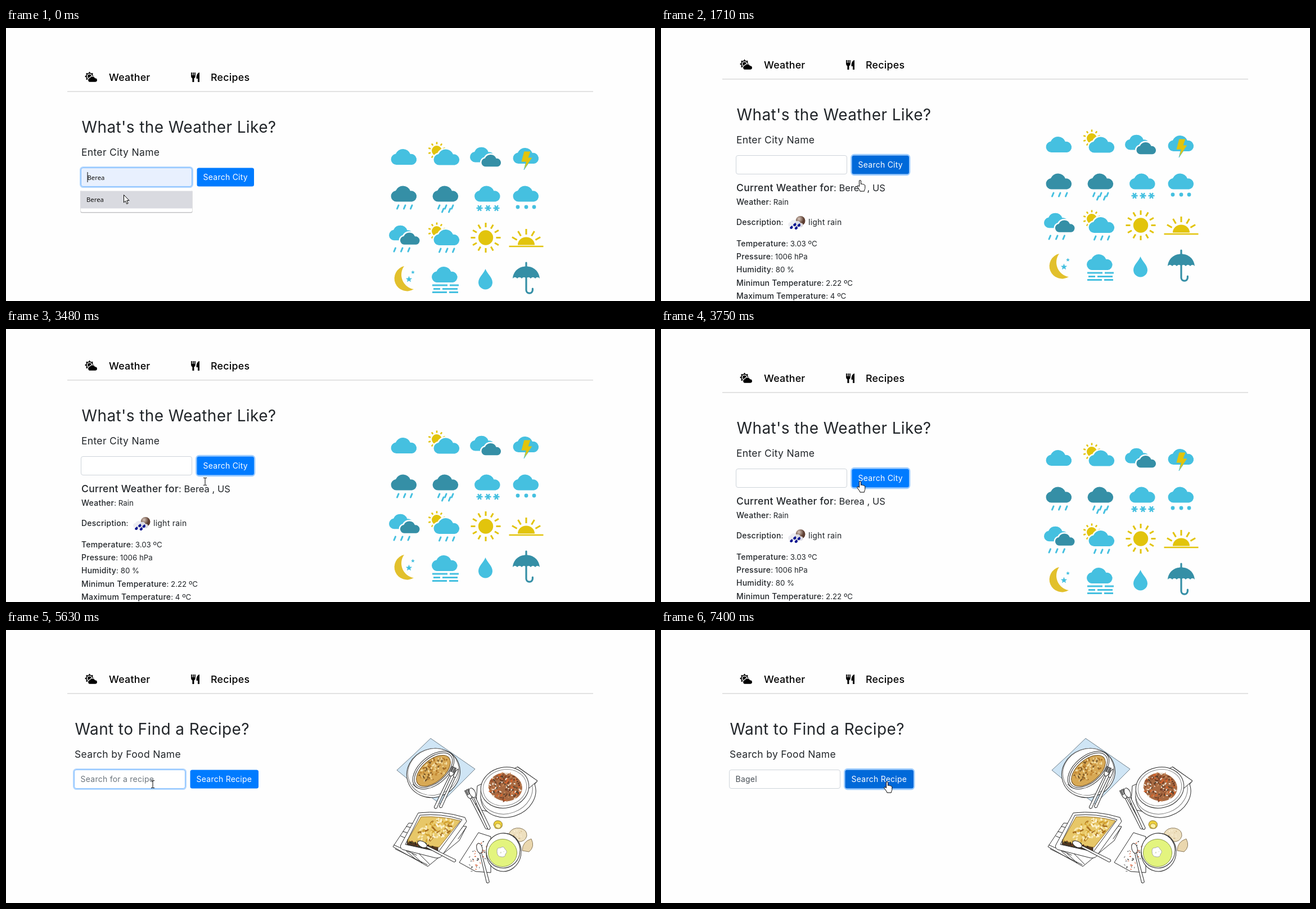
An HTML page that plays this animation: 1154 px wide and 485 px high, repeating every 8000 ms.

```html
<!DOCTYPE html>
<html lang="en">
<head>
<meta charset="utf-8">
<title>Weather and recipes</title>
<style>
  html, body { margin: 0; width: 100%; height: 100%; overflow: hidden; background: #fefefe; }
  svg { display: block; width: 1154px; height: 485px; }
  text { font: 400 14px Inter, "Open Sans", sans-serif; fill: #212529; letter-spacing: .25px; white-space: pre; }
  .nav { font-size: 17.8px; font-weight: 500; fill: #000; letter-spacing: .25px; }
  .title { font-size: 28px; letter-spacing: .38px; }
  .sub { font-size: 17.5px; letter-spacing: .32px; }
  .key { font-weight: 500; }
  .val { font-size: 13.3px; font-weight: 400; letter-spacing: 0; }
  .city { font-size: 16.5px; font-weight: 400; letter-spacing: 0; }
  .system { font: 11.3px "Noto Sans", "Open Sans", sans-serif; fill: #111; letter-spacing: 0; }
  .ink { fill: #fff; stroke: #2a2a2a; stroke-width: 1; stroke-linejoin: round; }
  .line { fill: none; stroke: #2a2a2a; stroke-width: 1; stroke-linecap: round; }
</style>
</head>
<body>
<svg viewBox="0 0 1154 485" xmlns="http://www.w3.org/2000/svg">
  <defs>
    <path id="cloud" d="M10 30A9.8 9.8 0 0 1 9 10.5A14 14 0 0 1 35 11A9.6 9.6 0 0 1 38 30Z"/>
    <radialGradient id="dusk" cx=".35" cy=".3"><stop offset="0" stop-color="#d9c8bd"/><stop offset="1" stop-color="#5c3d30"/></radialGradient>
  </defs>
  <g id="page">
    <g id="navSun"></g>
    <text class="nav" x="183" y="94">Weather</text>
    <g id="utensils">
      <path d="M329 79h1.8v5h1.2v-5h1.8v5h1.2v-5h1.8v6.5q0 3-2.4 4V96h-3v-6.5q-2.4-1-2.4-4z"/>
      <path d="M344 79V96h-3V90h-2.3C338 85 340 80 344 79z"/>
    </g>
    <text class="nav" x="364" y="94">Recipes</text>
    <rect x="109" y="112" width="935" height="1.5" fill="#dadada"/>
    <rect id="outline" x="315.5" y="62.5" width="131" height="50" fill="none" stroke="#6ca6ee" stroke-width="1.2"/>

    <g id="form">
      <text id="title" class="title" x="134.5" y="186"></text>
      <text id="sub" class="sub" x="134" y="227"></text>
      <rect id="fieldRing" x="132.3" y="247.3" width="199.4" height="35.4" rx="5" fill="none" stroke="#b3d7ff" stroke-width="2.6"/>
      <rect id="field" x="133.5" y="248.5" width="197" height="33" rx="3.5"/>
      <text id="entry" x="144.5" y="269.5"></text>
      <rect id="caret" y="256" width="1" height="18"/>
      <rect id="buttonRing" x="338.5" y="247.2" height="35.6" rx="5" fill="none" stroke="#9fcdff" stroke-width="2.8"/>
      <rect id="button" x="339.5" y="248.5" height="33" rx="3.5"/>
      <text id="label" x="350.5" y="269.5" style="fill:#fff"></text>
    </g>
    <g id="suggest">
      <rect x="132.5" y="288.5" width="199" height="40" rx="2" fill="#c4c4c6"/>
      <rect x="133" y="288" width="198" height="39" rx="2" fill="#fff"/>
      <rect x="132" y="289.5" width="199" height="31" fill="#d9dae0"/>
      <text class="system" x="143" y="309">Berea</text>
    </g>
    <g id="results"></g>
    <g id="icons"></g>
    <g id="meals"></g>
  </g>
  <path id="cursor" stroke="#000" stroke-linejoin="round"/>
</svg>

<script>
const $ = id => document.getElementById(id);
const SKY = '#45c0e0', TEAL = '#358fa6', GOLD = '#e2c40c', PAPER = '#fefefe';

// ---- weather icons ----
const cloud = (x, y, fill, scale = 1, halo = 0) =>
  `<use href="#cloud" transform="translate(${x} ${y}) scale(${scale})" fill="${fill}" stroke="${PAPER}" stroke-width="${halo / scale}" paint-order="stroke"/>`;

function rays(x, y, inner, outer, count, from = 0, to = 360, width = 3) {
  let d = '';
  for (let i = 0; i < count; i++) {
    const a = (from + (to - from) * i / count) * Math.PI / 180;
    const c = Math.cos(a), s = Math.sin(a);
    d += `M${x + c * inner} ${y + s * inner}L${x + c * outer} ${y + s * outer}`;
  }
  return `<path d="${d}" stroke="${GOLD}" stroke-width="${width}"/>`;
}
const disc = (x, y, r, fill) => `<circle cx="${x}" cy="${y}" r="${r}" fill="${fill}"/>`;
const drops = (x, y, count, step = 12) => Array.from({ length: count }, (_, i) =>
  `<path d="M${x + i * step} ${y}l-2.5 6" stroke="${SKY}" stroke-width="3" stroke-linecap="round"/>`).join('');

function star(x, y, outer, points, inner, fill) {
  const pts = Array.from({ length: points * 2 }, (_, i) => {
    const a = Math.PI * (i / points - .5), r = i % 2 ? inner : outer;
    return `${x + r * Math.cos(a)},${y + r * Math.sin(a)}`;
  });
  return `<polygon points="${pts.join(' ')}" fill="${fill}"/>`;
}
const smallSun = (x, y) => disc(x, y, 9, GOLD) + rays(x, y, 11.5, 15.5, 10, -18, 342, 2.6);
const flake = x => `<path transform="translate(${x} 320)" d="M-5.5 0H5.5M-2.8-4.8 2.8 4.8M-2.8 4.8 2.8-4.8" stroke="${SKY}" stroke-width="2.5"/>`;

$('navSun').innerHTML = star(148.5, 86, 8.5, 8, 6, '#000') + disc(148.5, 86, 4.8, PAPER) +
  disc(148.5, 86, 3.4, '#000') + cloud(146, 85.5, '#000', .345, 2.5);

$('icons').innerHTML = [
  cloud(684, 213, SKY),
  smallSun(766, 218), cloud(760, 213.5, SKY, 1, 5),
  cloud(824.5, 210, SKY, .95), cloud(845, 223.5, TEAL, .76, 5),
  cloud(901, 211, SKY),
  `<path d="M921 219H933L929 230H936L921 252 924.5 238H916Z" fill="${GOLD}" stroke="${SKY}" stroke-width=".8"/>`,

  cloud(684, 278.5, TEAL), drops(698, 315, 3),
  cloud(758, 278.5, TEAL), drops(771, 315, 3), drops(778, 321, 2),
  cloud(832.5, 278.5, SKY), flake(842), flake(857), flake(872),
  cloud(901, 278.5, SKY), [910, 925, 939].map(x => disc(x, 318, 3.4, SKY)).join(''),

  cloud(680.5, 349, SKY, .94), cloud(700.5, 362, TEAL, .76, 5), drops(692.5, 391, 3, 12.5),
  smallSun(766, 361), cloud(760, 356, SKY, 1, 5), drops(773, 392, 3),
  disc(853, 372.5, 13.2, GOLD), rays(853, 372.5, 18.5, 26.5, 12),
  `<path d="M910 385.5a15 14 0 0 1 30 0z" fill="${GOLD}"/><path d="M894.5 388H955.5" stroke="${GOLD}" stroke-width="2.4"/>`,
  rays(925, 386, 19, 29, 5, 210, 360),

  `<path d="M708 423A22.5 22.5 0 1 0 725 464A26 26 0 0 1 708 423Z" fill="#e2c02c"/>`,
  star(716.5, 446.5, 6, 5, 2.6, SKY), star(723.5, 434, 3.5, 5, 1.6, SKY),
  cloud(756.5, 422, SKY),
  `<path d="M758 457H785M789 457H805M760 463.5H772M776 463.5H803M758 469.5H784M788 469.5H804" stroke="${SKY}" stroke-width="2.8"/>`,
  `<path d="M852.5 428C856 437 865 443 865 452A12.5 12.5 0 0 1 840 452C840 443 849 437 852.5 428Z" fill="${SKY}"/>`,
  `<path d="M901 445C902 432 912 423.5 925 423.5S948 432 949 445${'q-4-4.5-8 0'.repeat(6)}Z" fill="${TEAL}"/>`,
  `<path d="M925 417V425M925 443V465.5a5.7 5.7 0 0 0 11.4 0V463" fill="none" stroke="${TEAL}" stroke-width="3.2" stroke-linecap="round"/>`
].join('');

// ---- search results ----
const row = (y, key, value, keyClass = 'key', valueClass = 'val') =>
  `<text class="${keyClass}" x="134" y="${y}">${key}<tspan class="${valueClass}">: ${value}</tspan></text>`;
$('results').innerHTML = [
  row(312, 'Current Weather for', 'Berea , US', 'sub key', 'city'),
  row(336, 'Weather', 'Rain'),
  row(371.5, 'Description', ''), '<text x="262" y="371.5">light rain</text>',
  disc(248, 364.5, 8.5, 'url(#dusk)'),
  cloud(226, 362, '#ececf1', .46), cloud(234, 364, '#dcdce4', .4),
  [[231.5, 376], [237.5, 371], [240, 377], [245, 372]].map(([x, y]) =>
    `<path d="M${x + 1.5} ${y - 3}q3 4 0 5.500t-4-1.500q0-1.500 4-4z" fill="#0b1590"/>`).join(''),
  row(409.5, 'Temperature', '3.03 ºC'),
  row(433, 'Pressure', '1006 hPa'),
  row(456, 'Humidity', '80 %'),
  row(479.5, 'Minimun Temperature', '2.22 ºC'),
  row(503, 'Maximum Temperature', '4 ºC'),
  row(526, 'Wind Speed', '9.8 m/s')
].join('');

// ---- meal drawings ----
let seed = 7;
const rnd = () => (seed = seed * 16807 % 2147483647) / 2147483647;

function crumbs(x, y, rx, ry, turn, count, colors, size) {
  let out = '';
  for (let i = 0; i < count; i++) {
    const a = rnd() * 6.283, r = Math.sqrt(rnd()) * .93;
    const cx = rx * r * Math.cos(a), cy = ry * r * Math.sin(a);
    out += `<ellipse rx="${size * (.5 + rnd())}" ry="${size * .55}" transform="translate(${cx} ${cy}) rotate(${rnd() * 180})" fill="${colors[i % colors.length]}"/>`;
  }
  return `<g transform="translate(${x} ${y}) rotate(${turn})">${out}</g>`;
}
const oval = (x, y, rx, ry, turn = 0, style = '') =>
  `<ellipse class="ink" cx="${x}" cy="${y}" rx="${rx}" ry="${ry}" transform="rotate(${turn} ${x} ${y})" style="${style}"/>`;
const shape = (d, style = '') => `<path class="ink" d="${d}" style="${style}"/>`;
const line = d => `<path class="line" d="${d}"/>`;
const tool = (x, y, turn, length, head) =>
  `<g transform="translate(${x} ${y}) rotate(${turn})">${shape(`M-1.5 15L-2.5 ${length}q2.5 3 5 0L1.5 15z`)}${head}</g>`;
const fork = shape('M-4 0L-4 10Q-4 16 0 17Q4 16 4 10L4 0 2.5 0V9H1V0H-1V9H-2.5V0Z');
const spoon = oval(0, 8, 5, 9);

$('meals').innerHTML = [
  shape('M695 249Q725 222 755 192.5L834 247 772 309Q735 282 695 249Z', 'fill:#cfe5f5;stroke:#6f7f8a'),
  oval(760, 254, 48, 43, -20), oval(760, 252, 46, 41, -20, 'stroke:#777'),
  oval(760, 249, 43, 25, -40), oval(760, 249, 40, 22, -40),
  oval(760, 250, 36, 19.5, -40, 'fill:#d8a955;stroke:#705020'),
  crumbs(760, 250, 34, 18, -40, 90, ['#a86c22', '#edd08a', '#c48a36', '#f3dfa8', '#7d5a2a'], 2.4),
  line('M723 274l7 6M789 217l7 6'),
  tool(797, 244, 25, 79, fork), tool(804, 247, 25, 74, shape('M-2 16Q-4 5 0 0Q3 6 2 16Z')),

  shape('M838 277L835 318 896 330 945 268 910 243Z'),
  oval(893, 291, 50, 41, -20), oval(890, 287, 47, 39, -20, 'stroke:#777'),
  shape('M909 243L945 268 930 281'),
  oval(887, 280, 43, 36, -12), oval(887, 280, 39, 32, -12, 'stroke:#888'),
  oval(888, 279, 30, 25, 10, 'fill:#a86a42;stroke:none'),
  crumbs(888, 279, 32, 27, 10, 170, ['#6b3a22', '#d9622a', '#efe6d8', '#8b4a2c', '#58432f', '#c98a5c'], 2.1),
  tool(819, 284, -28, 77, fork), tool(826, 282, -25, 78, spoon),
  shape('M867 346q1-9 10-7 7 2 5 10-3 6-12 3z', 'fill:#edcf38;stroke:#8d7a35'), oval(875, 348, 5, 4, 15, 'fill:#fff2aa;stroke:#a58d3b'),

  shape('M688 385L716 343 819 349 806 374 750 420Z'),
  line('M692 389L749 417M690 382L730 400M702 366l9 4M706 358l10 3M712 349l12 3M753 416l-18-18M740 414l-18-17M728 407l-16-14M804 371l14-20M799 366l13-16'),
  shape('M733 325Q774 320 816 333L819 340 777 398Q774 406 764 405L705 390Q699 386 703 380Z'),
  shape('M736 329Q774 325 811 337L769 394 710 381Z'),
  shape('M714 372L768 386V393L713 381Z', 'fill:#513720'),
  shape('M738 332Q774 330 808 339L770 386Q742 383 714 374Z', 'fill:#e7c768;stroke:#94702a'),
  crumbs(764, 355, 36, 18, -22, 110, ['#f8e8b4', '#d3a232', '#f2d67c', '#a8701f', '#fbf1cf'], 2.9),
  crumbs(738, 380, 25, 4, 14, 28, ['#823522', '#46602a', '#2e2118', '#c5a349'], 2.2),
  tool(733, 377, -63, 73, spoon),

  shape('M806 413L840 360 862 367 862 431 835 429Z'),
  crumbs(839, 402, 16, 32, 28, 48, ['#d9623b', '#444', '#999', '#e69a7e'], 1.5),
  shape('M894 362Q900 350 914 352 927 355 926 366 923 377 910 376Z', 'fill:#eee0bf;stroke:#8b7a5c'),
  shape('M918 392Q918 376 934 371 941 385 930 394Z', 'fill:#ead7ae;stroke:#8b7a5c'),
  crumbs(911, 364, 12, 9, 0, 12, ['#fff3da', '#d4b98a'], 1.5),
  oval(885, 395, 31, 34, 10), oval(884, 392, 30, 31, 10), oval(883, 396, 25.5, 24.5, 0, 'fill:#e3f47e;stroke:#89974b'),
  shape('M873 393q0-7 6-6 6-4 8 2 6 5 1 9 0 6-7 5-8 0-8-10z', 'stroke:#aaa'),
  crumbs(882, 395, 5, 5, 0, 5, ['#b8c59a'], .7),
  tool(840, 380, -14, 70, spoon)
].join('');

// ---- timeline: each step changes only the named values ----
const BLUE = '#007bff', PRESSED = '#0069d9', BETWEEN = '#0372ec';
const steps = [
  [0, { page: 'weather', scroll: 0, cursor: ['arrow', 209, 296], entry: 'Berea', mode: 'preview', suggest: true,
        caret: 'start', fieldRing: 1, buttonRing: 0, color: BLUE, results: false, outline: false, tab: '#000' }],
  [120, { cursor: ['arrow', 209, 297.5] }],
  [270, { cursor: ['arrow', 205, 290], suggest: false, mode: 'filled', caret: 'end' }],
  [395, { cursor: ['beam', 196, 279] }],
  [520, { cursor: ['beam', 190, 272] }],
  [670, { cursor: ['beam', 272, 272], caret: '' }],
  [790, { cursor: ['hand', 354, 270.5], color: PRESSED }],
  [930, { fieldRing: .4, buttonRing: .6 }],
  [1060, { fieldRing: 0, buttonRing: 1, entry: '', mode: '', results: true }],
  [1710, { scroll: 22 }],
  [1830, { scroll: 43.3 }],
  [2510, { cursor: ['beam', 354, 271], color: BETWEEN }],
  [2630, { color: BLUE }],
  [3480, { scroll: 22 }],
  [3600, { scroll: 2 }],
  [3750, { scroll: 0, cursor: ['hand', 354, 270.5] }],
  [3870, { cursor: ['hand', 357, 252], color: PRESSED }],
  [3990, { cursor: ['arrow', 366, 178], color: BLUE }],
  [4120, { cursor: ['arrow', 374, 118] }],
  [4240, { cursor: ['hand', 376, 85.5], tab: '#1e88ff' }],
  [4380, { page: 'recipes', outline: true, results: false, buttonRing: 0, mode: 'hint', entry: 'Search for a recipe' }],
  [4690, { cursor: ['arrow', 345, 154], tab: '#000' }],
  [4820, { cursor: ['beam', 271, 259] }],
  [4960, { cursor: ['beam', 261, 274] }],
  [5110, { outline: false, fieldRing: .5 }],
  [5230, { fieldRing: 1, caret: 'start' }],
  [5630, { caret: '' }],
  [6040, { mode: 'typed', entry: 'B', caret: 'end' }],
  [6190, { entry: 'Ba' }],
  [6320, { entry: 'Bag' }],
  [6450, { entry: 'Bagel' }],
  [6980, { caret: '' }],
  [7130, { cursor: ['hand', 418, 268] }],
  [7280, { cursor: ['hand', 402, 269.5], color: PRESSED, fieldRing: .4, buttonRing: .5 }],
  [7400, { fieldRing: 0, buttonRing: 1 }]
];
const states = [];
steps.reduce((last, [, change]) => {
  const next = { ...last, ...change };
  states.push(next);
  return next;
}, {});

const cursors = {
  arrow: 'M.5.5V14L3.5 11.2 5.7 16.5 8 15.5 5.8 10.4H10Z',
  hand: 'M-1.5 11V1.5a1.5 1.5 0 0 1 3 0V7c1-1 2.6-.8 3 .4 1-.7 2.4-.3 2.6.8 1-.3 1.7.3 1.7 1.3V14c0 1.5-1.3 3-1.5 5.5H0C-.5 17-3.5 14-5 11.5c-.8-1.5.8-2.6 2-1.5z',
  beam: 'M-3-6.5H-.7L0-6 .7-6.5H3M0-6V6M-3 6.5H-.7L0 6 .7 6.5H3'
};
const copy = {
  weather: ["What's the Weather Like?", 'Enter City Name', 'Search City', 101.5],
  recipes: ['Want to Find a Recipe?', 'Search by Food Name', 'Search Recipe', 121.5]
};
const set = (id, attrs) => { for (const k in attrs) $(id).setAttribute(k, attrs[k]); };
const show = (id, on) => set(id, { visibility: on ? 'visible' : 'hidden' });

function draw(s) {
  const weather = s.page === 'weather';
  const [title, sub, label, width] = copy[s.page];
  $('title').textContent = title;
  $('sub').textContent = sub;
  $('label').textContent = label;
  $('entry').textContent = s.entry;
  set('page', { transform: `translate(0 ${-s.scroll})` });
  set('form', { transform: `translate(${weather ? 0 : -12} 0)` });
  set('utensils', { fill: s.tab });

  const autofill = s.mode === 'preview' || s.mode === 'filled';
  set('field', { fill: autofill ? '#e8f0fe' : '#fff', stroke: s.fieldRing ? '#80bdff' : '#ced4da' });
  set('fieldRing', { opacity: s.fieldRing });
  set('entry', { class: s.mode === 'preview' ? 'system' : '' });
  $('entry').style.fill = s.mode === 'hint' ? '#6c757d' : autofill ? '#111' : '#495057';
  set('button', { width, fill: s.color });
  set('buttonRing', { width: width + 2, opacity: s.buttonRing });
  set('caret', { x: 144.5 + (s.caret === 'end' ? $('entry').getComputedTextLength() : 0) });

  show('caret', s.caret);
  show('suggest', s.suggest);
  show('results', s.results);
  show('outline', s.outline);
  show('icons', weather);
  show('meals', !weather);
  const [kind, x, y] = s.cursor;
  set('cursor', { d: cursors[kind], transform: `translate(${x} ${y})`, fill: kind === 'beam' ? 'none' : '#fff' });
}

let current = -1;
function tick() {
  const time = performance.now() % 8000;
  const index = steps.findLastIndex(([at]) => at <= time);
  if (index !== current) draw(states[current = index]);
  requestAnimationFrame(tick);
}
tick();
</script>
</body>
</html>
```
